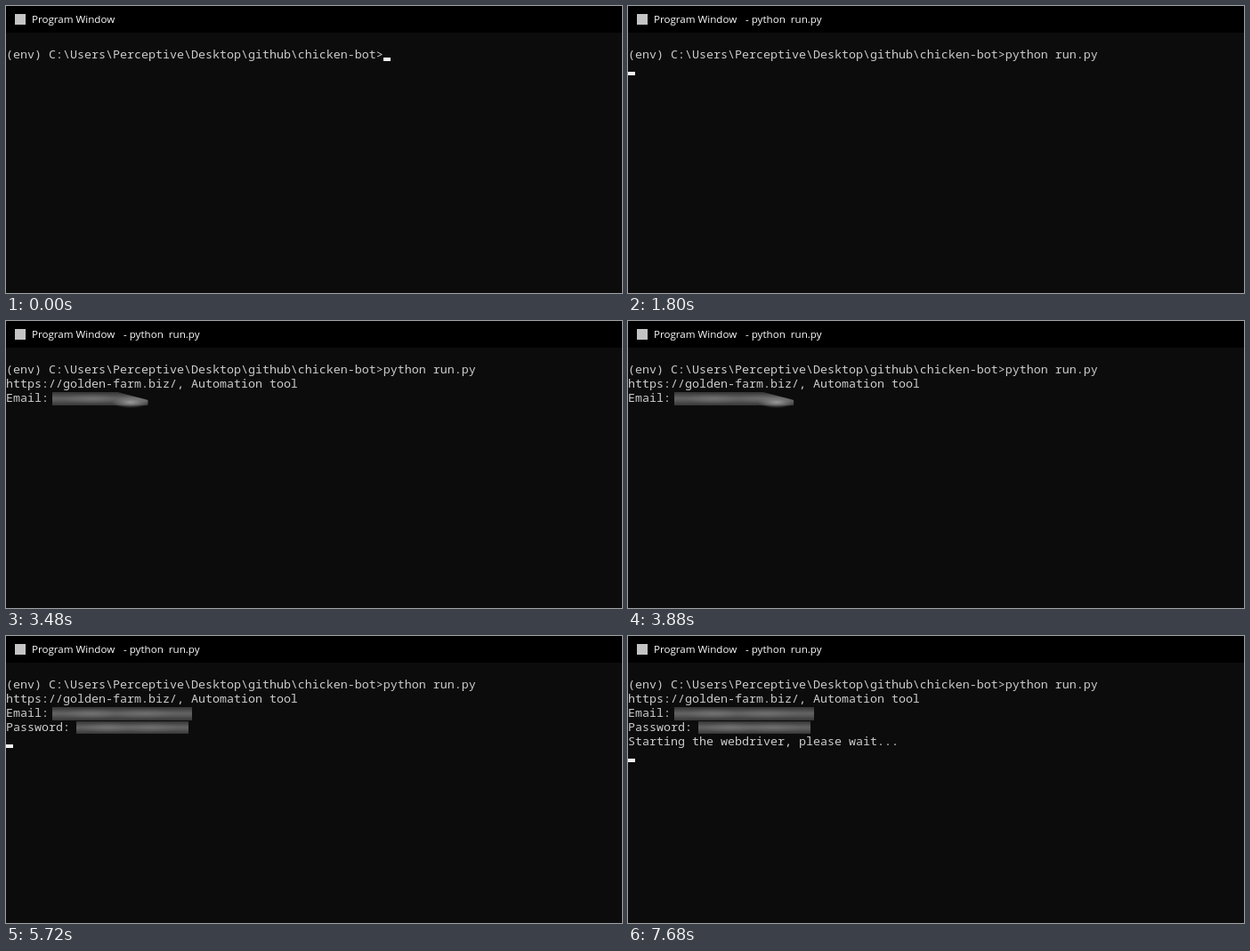
Animation of 692x323 px, one loop 8000 ms. Source, as an HTML page:

```html
<!DOCTYPE html>
<html lang="en">
<head>
<meta charset="utf-8">
<title>Console session</title>
<style>
html, body { margin: 0; width: 100%; height: 100%; overflow: hidden; background: #0c0c0c; }
#stage { position: relative; width: 692px; height: 323px; overflow: hidden; }
#stage div, #stage span { position: absolute; white-space: pre; }

#bar { left: 0; top: 0; width: 692px; height: 30px; background: #000;
  font: 11.6px/20px "Open Sans", "Noto Sans", sans-serif; color: #fff; }
#bar span { top: 5px; }
#icon { left: 10px; top: 9px; width: 12px; height: 12px; background: #c4c4c4; }

#screen { left: 0; top: 46px; color: #ccc;
  font: 13.333px/16px "Noto Sans Mono", "DejaVu Sans Mono", monospace; }
#screen span { left: 0; }
#cursor { width: 8px; height: 4px; background: #f2f2f2; }

.smear { background:
  radial-gradient(ellipse 30px 6px at 28% 50%, #8886, #8880),
  radial-gradient(ellipse 34px 6px at 66% 50%, #8885, #8880),
  linear-gradient(#343434, #626262 45%, #5c5c5c 60%, #363636); }
#email { left: 52px; top: 34px; width: 157px; height: 15px; }
#secret { left: 79px; top: 50px; width: 126px; height: 14px; }
#tip { top: 39px; width: 42px; height: 13px;
  background: radial-gradient(closest-side, #999, #80808099 55%, #80808000); }
</style>
</head>
<body>
<div id="stage">
  <div id="bar">
    <div id="icon"></div>
    <span style="left:29px">Program Window</span>
    <span style="left:132px" data-from="1800">- python  run.py</span>
  </div>
  <div id="screen">
    <span style="top:0">(env) C:\Users\Perceptive\Desktop\github\chicken-bot&gt;<b id="typed" style="font-weight:400"></b></span>
    <span style="top:16px" data-from="1960">https://golden-farm.biz/, Automation tool</span>
    <span style="top:32px" data-from="1960">Email:</span>
    <span style="top:48px" data-from="4400">Password:</span>
    <span style="top:64px" data-from="5760">Starting the webdriver, please wait...</span>
    <div id="cursor"></div>
    <div id="email" class="smear"></div>
    <div id="tip"></div>
    <div id="secret" class="smear"></div>
  </div>
</div>
<script>
const LOOP = 8000;
const COMMAND = "python run.py";
const PROMPT_COLS = 53;
const $ = id => document.getElementById(id);
const timed = [...document.querySelectorAll("[data-from]")];

// Ten quick keystrokes, a pause, then slower ones.
const keyTime = i => i < 10 ? 200 + i * 88 : 1400 + (i - 10) * 120;

// Where the cursor rests after the typing: time, column, row.
const rests = [[1760, 0, 1], [1960, 7, 2], [4400, 10, 3], [5600, 0, 4], [5760, 0, 5]];

// Key points of the smears: time, width.
const emailPath = [[2640, 14], [2880, 70], [3840, 134], [4160, 157]];
const secretPath = [[4640, 27], [5120, 27], [5200, 126]];

const show = (el, on) => { el.style.visibility = on ? "visible" : "hidden"; };

// Interpolated width, advancing once per tick.
function widthAt(path, t, tick) {
  t = Math.floor(t / tick) * tick;
  if (t < path[0][0]) return 0;
  const next = path.findIndex(p => p[0] > t);
  if (next < 0) return path.at(-1)[1];
  const [[t0, w0], [t1, w1]] = path.slice(next - 1, next + 1);
  return w0 + (w1 - w0) * (t - t0) / (t1 - t0);
}

// Cuts a bar to width w with its top right corner sloping down.
function cut(el, w, slope) {
  show(el, w > 0);
  const shoulder = Math.max(0, w - slope);
  el.style.clipPath = w >= el.offsetWidth ? "none"
    : `polygon(0 0, ${shoulder}px 0, ${w}px 9px, ${w}px 100%, 0 100%)`;
}

function placeCursor(t, typed) {
  const [start, col, row] = rests.findLast(r => r[0] <= t) || [t, PROMPT_COLS + typed, 0];
  const blink = Math.floor((t - start - 640) / 420);
  const cursor = $("cursor");
  show(cursor, blink < 0 || blink % 2);
  cursor.style.left = col * 8 + "px";
  cursor.style.top = row * 16 + 12 + "px";
}

function render(t) {
  for (const el of timed) show(el, t >= el.dataset.from);

  const typed = [...COMMAND].filter((_, i) => keyTime(i) <= t).length;
  $("typed").textContent = COMMAND.slice(0, typed);
  placeCursor(t, typed);

  const w = widthAt(emailPath, t, 80);
  cut($("email"), w, 34);
  show($("tip"), w > 30 && w < 157);
  $("tip").style.left = 52 + w - 40 + "px";
  cut($("secret"), widthAt(secretPath, t, 40), 24);
}

function frame() {
  render(performance.now() % LOOP);
  requestAnimationFrame(frame);
}
frame();
</script>
</body>
</html>
```
